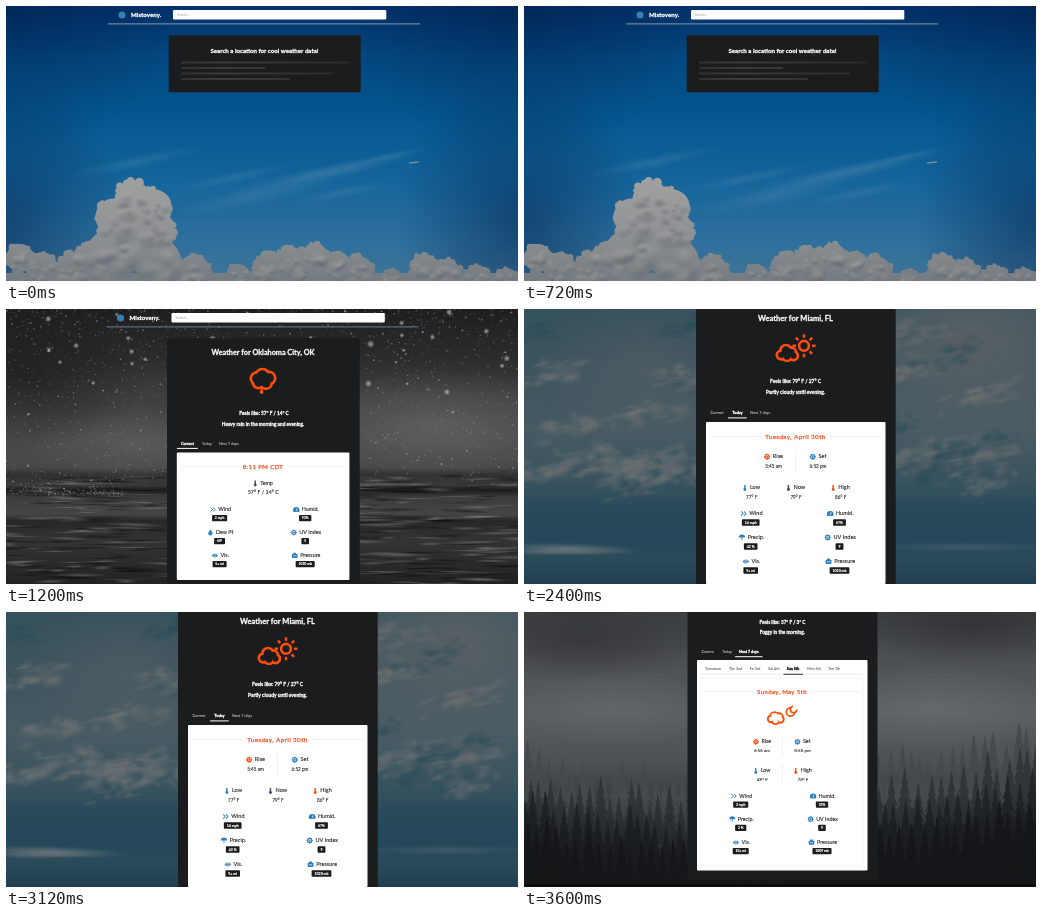
These frames come from a looping animation (512x275 px, 4.8 s). An HTML page with a canvas:

```html
<!DOCTYPE html>
<html lang="en">
<head>
<meta charset="utf-8">
<title>Weather</title>
<style>
html, body { margin: 0; width: 100%; height: 100%; overflow: hidden; background: #1b1c1d; }
canvas { display: block; width: 512px; height: 275px; }
</style>
</head>
<body>
<canvas id="stage"></canvas>
<script>
const W = 512, H = 275, HOLD = 1200;
const DARK = '#1b1c1d', BLUE = '#2f7fbd', ORANGE = '#fb4d0c', TAU = Math.PI * 2;
const canvas = document.getElementById('stage');
const c = canvas.getContext('2d');
const dpr = window.devicePixelRatio || 1;
canvas.width = W * dpr;
canvas.height = H * dpr;

function rng(seed) {
  return () => (seed = (seed * 16807) % 2147483647) / 2147483647;
}

function rect(x, y, w, h, fill, r = 0) {
  c.fillStyle = fill;
  c.beginPath();
  c.roundRect(x, y, w, h, r);
  c.fill();
}

function disc(x, y, r, fill) {
  c.fillStyle = fill;
  c.beginPath();
  c.arc(x, y, r, 0, TAU);
  c.fill();
}

function ring(x, y, r, color, width) {
  c.strokeStyle = color;
  c.lineWidth = width;
  c.beginPath();
  c.arc(x, y, r, 0, TAU);
  c.stroke();
}

function line(x1, y1, x2, y2, color, width = 1) {
  c.strokeStyle = color;
  c.lineWidth = width;
  c.beginPath();
  c.moveTo(x1, y1);
  c.lineTo(x2, y2);
  c.stroke();
}

function setFont(size, bold, spacing = 0) {
  c.font = `${bold ? 'bold ' : ''}${size}px Lato, sans-serif`;
  c.letterSpacing = spacing + 'px';
}

// weight adds a thin outline so that small type keeps its density
function text(str, x, y, size, { color = '#fff', bold = false, align = 'center', spacing = 0, weight = bold ? .28 : .1 } = {}) {
  setFont(size, bold, spacing);
  c.fillStyle = c.strokeStyle = color;
  c.lineWidth = weight;
  c.lineJoin = 'round';
  c.textAlign = align;
  c.textBaseline = 'middle';
  c.fillText(str, x, y + .3);
  c.strokeText(str, x, y + .3);
}

function fade(y0, y1, stops) {
  const g = c.createLinearGradient(0, y0, 0, y1);
  for (const [y, color] of stops) g.addColorStop((y - y0) / (y1 - y0), color);
  rect(0, y0, W, y1 - y0, g);
}

function sky(...stops) {
  fade(0, H, stops);
}

// Soft elliptical glow; rgb is "r,g,b"
function haze(x, y, rx, ry, rgb, alpha, tilt = 0) {
  c.save();
  c.translate(x, y);
  c.rotate(tilt);
  c.scale(rx, ry);
  const g = c.createRadialGradient(0, 0, 0, 0, 0, 1);
  g.addColorStop(0, `rgba(${rgb},${alpha})`);
  g.addColorStop(1, `rgba(${rgb},0)`);
  disc(0, 0, 1, g);
  c.restore();
}

// ---- Backdrops ----

function blueSky() {
  sky([0, '#033068'], [50, '#03477f'], [110, '#045790'], [180, '#16659b'], [235, '#2f709d'], [275, '#3f7396']);
  for (const x of [0, W]) {
    haze(x, 0, 170, 150, '0,20,60', .35);
    haze(x, 215, 120, 150, '6,45,88', .6);
  }
  const wisps = [[340, 162, 75, 7], [300, 172, 90, 9], [335, 187, 50, 6], [385, 150, 40, 4], [130, 156, 70, 7], [250, 190, 80, 9], [225, 172, 60, 6]];
  for (const [x, y, rx, ry] of wisps) haze(x, y, rx, ry, '120,160,190', .2, -.2);
  line(403, 157.2, 413, 155.8, '#9aa0a6', 1);

  const rand = rng(41);
  const heaps = [
    [127, 194, 20], [148, 201, 19], [108, 211, 20], [148, 222, 21], [126, 232, 32], [104, 248, 26], [152, 256, 25],
    [14, 252, 15], [36, 262, 17], [66, 264, 18], [84, 258, 22], [188, 265, 17],
    [232, 270, 13], [262, 263, 17], [285, 258, 18], [309, 253, 16], [330, 261, 17], [352, 266, 17],
    [385, 273, 11], [418, 262, 15], [440, 268, 16], [470, 273, 14], [500, 274, 13]
  ];
  const lobes = [];
  for (const [x, y, r] of heaps) {
    lobes.push([x, y, r * .93]);
    for (let i = 0; i < 26; i++) {
      const a = rand() * TAU, d = r * (.7 + rand() * .28);
      lobes.push([x + Math.cos(a) * d, y + Math.sin(a) * d, r * (.08 + rand() * .15)]);
    }
  }
  const body = c.createLinearGradient(0, 172, 0, H);
  body.addColorStop(0, '#a0a0a0');
  body.addColorStop(.55, '#8e9193');
  body.addColorStop(1, '#737a80');
  for (const [x, y, r] of lobes) disc(x, y, r, body);
  rect(0, 267, W, 8, body);
  for (const [x, y, r] of heaps) {
    for (let i = 0; i < 9; i++) {
      const px = x + (rand() - .5) * r * 1.3, py = y + (rand() - .35) * r, size = r * (.2 + rand() * .25);
      haze(px + 1, py + size * .6, size, size * .8, '92,100,108', .4);
      haze(px, py, size, size * .8, '166,165,163', .35);
    }
  }
}

function rain() {
  sky([0, '#1e1e1e'], [50, '#2c2c2c'], [85, '#3e3e3e'], [130, '#4a4a4a'], [158, '#484848'], [166, '#303030'], [176, '#3a3a3a'],
    [181, '#1c1c1c'], [188, '#3c3c3c'], [205, '#454545'], [212, '#272727'], [232, '#343434'], [275, '#222']);
  haze(430, 115, 150, 55, '135,135,135', .35);
  haze(130, 135, 110, 40, '135,135,135', .25);
  haze(20, 70, 120, 70, '12,12,12', .45);
  const rand = rng(977);
  for (let i = 0; i < 2600; i++) {
    const y = Math.pow(rand(), 1.6) * 180;
    disc(rand() * W, y, .35 + rand() * rand() * .8, `rgba(200,200,200,${.08 + rand() * .4})`);
  }
  for (let i = 0; i < 40; i++) {
    const r = 1.5 + rand() * 2.5;
    haze(rand() * W, rand() * 110, r, r, '215,215,215', .7);
  }
  for (let i = 0; i < 420; i++) {
    const x = rand() * W, y = 166 + rand() * 109, v = rand() < .5 ? 8 : 140;
    haze(x, y, 8 + rand() * 30, .7 + rand() * 1.6, `${v},${v},${v}`, .45, (rand() - .5) * .08);
  }
  for (let i = 0; i < 260; i++) {
    const spread = (rand() - .5) * 120;
    disc(60 + spread, 186 - rand() * rand() * 26, .3 + rand() * .5, `rgba(205,205,205,${rand() * .6})`);
  }
}

function dusk() {
  sky([0, '#34515c'], [60, '#3d545e'], [120, '#465a62'], [170, '#3a545f'], [205, '#27495a'], [230, '#24485a'], [250, '#2b4b5a'], [275, '#213f4f']);
  haze(450, 30, 170, 130, '98,100,103', .75);
  haze(120, 60, 110, 80, '98,100,103', .4);
  const rand = rng(305);
  for (let k = 0; k < 34; k++) {
    const cx = rand() * W, cy = rand() * 190;
    const rgb = k % 4 ? '120,119,118' : '35,72,86';
    for (let i = 0; i < 26; i++) {
      const dx = (rand() + rand() - 1) * 48, dy = (rand() + rand() - 1) * 16 - dx * .2;
      haze(cx + dx, cy + dy, 4 + rand() * 11, 2 + rand() * 5, rgb, .3, -.2);
    }
  }
  haze(45, 240, 75, 6, '120,126,130', .75, .03);
  haze(30, 243, 60, 4, '120,126,130', .5);
  haze(440, 238, 90, 5, '105,116,122', .35);
}

function tree(x, top, h, color) {
  c.fillStyle = color;
  c.beginPath();
  c.moveTo(x, top);
  const tiers = 9;
  for (const side of [1, -1]) {
    for (let k = 1; k <= tiers; k++) {
      const i = side > 0 ? k : tiers + 1 - k;
      const y = top + h * i / tiers, w = h * .19 * i / tiers;
      if (side > 0) {
        c.lineTo(x + w, y);
        c.lineTo(x + w * .55, y - 1);
      } else {
        c.lineTo(x - w * .55, y - 1);
        c.lineTo(x - w, y);
      }
    }
  }
  c.fill();
}

function fog() {
  sky([0, '#3b3e40'], [40, '#4b4e50'], [100, '#5c5f61'], [150, '#4e5153'], [210, '#2d3032'], [275, '#151719']);
  haze(60, 30, 130, 40, '30,32,34', .4);
  haze(450, 15, 120, 40, '30,32,34', .4);
  haze(410, 95, 110, 45, '125,128,130', .28);
  haze(90, 95, 90, 40, '125,128,130', .2);
  const rand = rng(5150);
  const layers = [[148, '#45494b', 44], [170, '#313538', 52], [194, '#212527', 60], [222, '#16191b', 66]];
  for (const [base, color, h] of layers) {
    for (let x = -6; x < 520; x += 7 + rand() * 7) {
      const slope = x > 256 ? (x - 350) * .19 : (60 - x) * .17;
      tree(x, base - slope + (rand() - .5) * 24, h + rand() * 55, color);
    }
    haze(256, base + 50, 330, 32, '90,94,97', .13);
  }
  fade(185, H, [[185, 'rgba(18,20,22,0)'], [245, 'rgba(18,20,22,.65)'], [275, 'rgba(18,20,22,.8)']]);
  rect(0, 272, W, 3, '#0b0c0d');
}

// ---- Icons, each about 6 units wide around the centre ----

const icons = {
  wind(k) {
    c.strokeStyle = k;
    c.lineWidth = 1;
    c.beginPath();
    for (const x of [-2.3, .4]) {
      c.moveTo(x, -2);
      c.lineTo(x + 2, 0);
      c.lineTo(x, 2);
    }
    c.stroke();
  },
  gauge(k) {
    c.fillStyle = k;
    c.beginPath();
    c.arc(0, .8, 3.2, Math.PI, TAU);
    c.lineTo(2.8, 2.4);
    c.lineTo(-2.8, 2.4);
    c.fill();
    line(0, 1.8, .8, -1.2, '#fff', .7);
  },
  drop(k) {
    disc(0, .9, 2.1, k);
    c.beginPath();
    c.moveTo(0, -3.2);
    c.lineTo(1.9, .3);
    c.lineTo(-1.9, .3);
    c.fill();
  },
  sun(k) {
    ring(0, 0, 2, k, 1.2);
    for (let a = 0; a < 8; a++) {
      const x = Math.cos(a * TAU / 8), y = Math.sin(a * TAU / 8);
      line(x * 2, y * 2, x * 3, y * 3, k, .8);
    }
    disc(0, 0, .9, k);
  },
  eye(k) {
    c.fillStyle = k;
    c.beginPath();
    c.moveTo(-3.2, 0);
    c.quadraticCurveTo(0, -4, 3.2, 0);
    c.quadraticCurveTo(0, 4, -3.2, 0);
    c.fill();
    ring(0, 0, 1.2, '#fff', .5);
  },
  press(k) {
    rect(-2.8, -1.6, 5.6, 4, k, .7);
    rect(-1.4, -2.8, 2.8, 1.5, k, .5);
    line(-1.5, .3, 1.5, .3, '#fff', .6);
  },
  umbrella(k) {
    c.fillStyle = k;
    c.beginPath();
    c.arc(0, 0, 3, Math.PI, TAU);
    c.fill();
    line(0, -.2, 0, 2.7, k, .8);
  },
  temp(k) {
    line(0, -2.8, 0, 1.4, k, 1.4);
    disc(0, 1.7, 1.4, k);
  }
};

function puff(list, width, fill) {
  for (const [x, y, r] of list) disc(x, y, r + width / 2, ORANGE);
  for (const [x, y, r] of list) disc(x, y, r - width / 2, fill);
}

// ---- Page parts ----

function nav(x, rule) {
  disc(x + 14, 9, 3.6, '#347fb4');
  text('Mistoveny.', x + 23, 8.8, 6.2, { bold: true, align: 'left' });
  rect(x + 65, 4, 213.3, 9.5, '#fff', 1.3);
  text('Search...', x + 69, 9, 3.5, { color: '#bbb', align: 'left' });
  line(x, 17.9, x + 312, 17.9, rule, .9);
}

function tabs(x, y, s, active) {
  const names = ['Current', 'Today', 'Next 7 days'], at = [4, 25, 42];
  const size = 3.75 * s;
  names.forEach((name, i) => {
    const on = i === active, left = x + at[i] * s;
    text(name, left, y, size, { bold: on, align: 'left', color: on ? '#fff' : '#b9babb' });
    if (on) rect(left - 4 * s, y + 4.6, c.measureText(name).width + 8 * s, 1, '#fff');
  });
}

function heading(str, cx, y, s, half) {
  text(str, cx, y, 6 * s, { color: '#f4511e', spacing: .4 * s, weight: .25 });
  const gap = c.measureText(str).width / 2 + 4;
  line(cx - half, y, cx - gap, y, '#e4e4e4', .6);
  line(cx + gap, y, cx + half, y, '#e4e4e4', .6);
}

function label(icon, str, cx, y, s, color = BLUE) {
  const size = 5.35 * s, slim = icon === 'temp', space = (slim ? 6.4 : 8.5) * s;
  setFont(size);
  const left = cx - (c.measureText(str).width + space) / 2;
  c.save();
  c.translate(left + (slim ? 1.5 : 3) * s, y);
  c.scale(s, s);
  icons[icon](color);
  c.restore();
  text(str, left + space, y - .3, size, { color: '#222', align: 'left' });
}

function stat(icon, name, value, cx, y, s, color, size = 4.5) {
  label(icon, name, cx, y, s, color);
  text(value, cx, y + 9 * s, size * s, { color: '#222' });
}

function badge(icon, name, value, cx, y, s, color) {
  label(icon, name, cx, y, s, color);
  setFont(3.4 * s, true);
  const w = c.measureText(value).width + 5.6 * s;
  rect(cx - .8 - w / 2, y + 5.5 * s, w, 6.3 * s, DARK, .8);
  text(value, cx - .8, y + 8.6 * s, 3.4 * s, { bold: true, weight: .15 });
}

function grid(xs, y, step, s, values, wet) {
  const cells = [['wind', 'Wind'], ['gauge', 'Humid.'], wet, ['sun', 'UV Index'], ['eye', 'Vis.'], ['press', 'Pressure']];
  cells.forEach(([icon, name], i) => badge(icon, name, values[i], xs[i % 2], y + (i >> 1) * step, s));
}

// ---- Scenes ----

function start() {
  blueSky();
  nav(102, '#8fa5b8');
  rect(162.7, 29.2, 192, 57, DARK, .8);
  text('Search a location for cool weather data!', 258.5, 44.5, 6.15, { bold: true });
  [168, 84, 151, 109].forEach((w, i) => {
    const g = c.createLinearGradient(175, 0, 343, 0);
    g.addColorStop(0, '#303132');
    g.addColorStop(.25, '#3a3b3c');
    g.addColorStop(1, '#292a2b');
    rect(175, 55.5 + i * 5.5, w, 2, g);
  });
}

function current() {
  rain();
  nav(100.5, '#7187a5');
  rect(161, 29.3, 192.7, 246, DARK, .8);
  text('Weather for Oklahoma City, OK', 257, 43.3, 7.25, { bold: true });
  puff([[256.5, 67, 7], [251, 69.5, 6.2], [263, 69, 6.2], [252.5, 73.5, 5.6], [260, 74, 5.8], [256.5, 72, 6]], 2.7, DARK);
  disc(255.6, 83, 1.9, ORANGE);
  line(255.6, 79, 255.6, 83, ORANGE, 1.8);
  text('Feels like: 57° F / 14° C', 258, 104.3, 4.75, { bold: true });
  text('Heavy rain in the morning and evening.', 257, 114.8, 4.75, { bold: true });
  tabs(171, 134.3, 1, 0);
  rect(170.8, 143.4, 172.6, 127.5, '#fff', 1);
  heading('8:11 PM CDT', 257, 157.6, 1, 82);
  stat('temp', 'Temp', '57° F / 14° C', 257.3, 174.3, 1, '#3d4b5c', 5.3);
  grid([214.4, 300], 200.5, 23, 1, ['2 mph', '93%', '60°', '5', '5+ mi', '1010 mb'], ['drop', 'Dew Pt']);
}

function today() {
  dusk();
  const s = 1.04;
  rect(172, 0, 199.7, H, DARK);
  text('Weather for Miami, FL', 271.5, 9, 7.5, { bold: true });
  ring(280, 36.8, 4.9, ORANGE, 2.6);
  for (let i = 0; i < 8; i++) {
    if (i === 3) continue;
    const x = Math.cos(i * TAU / 8), y = Math.sin(i * TAU / 8);
    line(280 + x * 8, 36.8 + y * 8, 280 + x * 11.5, 36.8 + y * 11.5, ORANGE, 2.5);
  }
  puff([[262, 41.8, 5.8], [257.2, 46, 4.4], [267, 43.5, 5], [269.5, 46.8, 4.4], [263, 47.2, 4.8]], 2.7, DARK);
  text('Feels like: 79° F / 27° C', 271.5, 72.5, 4.9, { bold: true });
  text('Partly cloudy until evening.', 271.5, 83.3, 4.9, { bold: true });
  tabs(182.3, 103.8, s, 1);
  rect(182, 113, 179.5, 162, '#fff', 1);
  heading('Tuesday, April 30th', 271.5, 127.6, s, 86);
  stat('sun', 'Rise', '5:45 am', 249.5, 147.8, s, ORANGE);
  stat('sun', 'Set', '6:52 pm', 294, 147.8, s);
  line(271.5, 142, 271.5, 163, '#e4e4e4', .6);
  stat('temp', 'Low', '77° F', 227.7, 178.8, s);
  stat('temp', 'Now', '79° F', 272, 178.8, s, '#3d4b5c');
  stat('temp', 'High', '86° F', 316.7, 178.8, s, ORANGE);
  grid([227.5, 316.3], 204.5, 24, s, ['14 mph', '67%', '42 %', '9', '9+ mi', '1020 mb'], ['umbrella', 'Precip.']);
}

function week() {
  fog();
  rect(163.5, 0, 190, 268, DARK);
  text('Feels like: 37° F / 3° C', 258.5, 10, 4.7, { bold: true });
  text('Foggy in the morning.', 258.3, 20.3, 4.7, { bold: true });
  tabs(173.5, 39.6, .99, 2);
  rect(173, 48, 170.5, 210.5, '#fff', 1);
  line(177, 62.3, 339, 62.3, '#dcdcdc', .6);
  c.strokeStyle = '#e6e6e6';
  c.lineWidth = .5;
  c.strokeRect(177, 66, 162, 188);
  const days = [['Tomorrow', 189], ['Thu 2nd', 211.5], ['Fri 3rd', 231], ['Sat 4th', 249.8], ['Sun 5th', 269], ['Mon 6th', 290], ['Tue 7th', 310.3]];
  days.forEach(([day, x], i) => text(day, x, 57, 3.6, { color: i === 4 ? '#111' : '#666', bold: i === 4 }));
  rect(259.5, 61.8, 19.5, .9, DARK);
  heading('Sunday, May 5th', 258, 79.7, 1, 78);
  disc(266.5, 100, 5, ORANGE);
  disc(266.5, 100, 3.3, '#fff');
  puff([[269.5, 97.5, 3.2]], 1.6, '#fff');
  rect(269, 93, 5.5, 4.5, '#fff');
  puff([[250.5, 104.5, 4.4], [247, 107, 3.2], [255, 105, 3.8], [256.5, 107.5, 3.2], [251.5, 108.5, 3.6]], 1.9, '#fff');
  stat('sun', 'Rise', '6:56 am', 238, 129.8, 1, ORANGE);
  stat('sun', 'Set', '8:58 pm', 278.5, 129.8, 1);
  line(258.3, 124, 258.3, 144, '#e4e4e4', .6);
  stat('temp', 'Low', '49° F', 238.3, 158.8, 1);
  stat('temp', 'High', '78° F', 279, 158.8, 1, ORANGE);
  line(258.3, 153, 258.3, 173, '#e4e4e4', .6);
  grid([217.5, 298.8], 184, 23.2, 1, ['2 mph', '53%', '2 %', '9', '10+ mi', '1009 mb'], ['umbrella', 'Precip.']);
}

const scenes = [start, current, today, week];
let shown = -1;

function tick() {
  const i = Math.floor(performance.now() / HOLD) % scenes.length;
  if (i !== shown) {
    shown = i;
    c.setTransform(dpr, 0, 0, dpr, 0, 0);
    scenes[i]();
  }
  requestAnimationFrame(tick);
}
tick();
</script>
</body>
</html>
```
